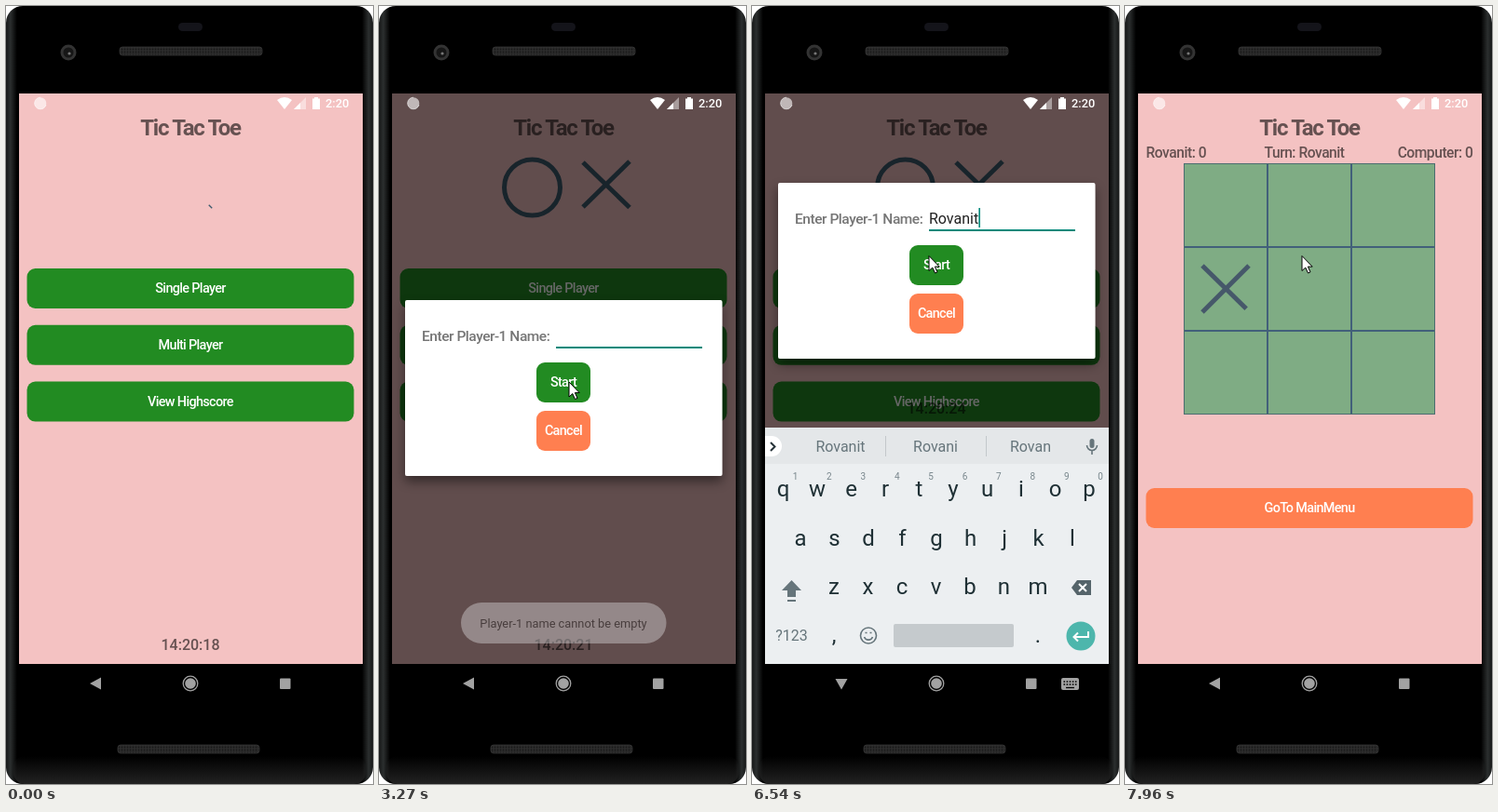
An HTML page that plays this animation: 394x836 px, repeating every 7.99 s.

```html
<!DOCTYPE html>
<html lang="en">
<head>
<meta charset="utf-8">
<title>Tic Tac Toe</title>
<style>
html, body { margin: 0; width: 100%; height: 100%; overflow: hidden; background: #fff; }
svg { display: block; width: 100%; height: 100%; font-family: Roboto, sans-serif; }
.mid { text-anchor: middle; }
.title { font-size: 24px; font-weight: 700; letter-spacing: -.053em; }
.ink { fill: rgba(0, 0, 0, .58); }
.btn { font-size: 14.4px; font-weight: 500; letter-spacing: -.045em; fill: #fff; text-anchor: middle; }
.score { font-size: 15.6px; font-weight: 500; letter-spacing: -.03em; }
.mark { fill: none; stroke: #3d5b6d; stroke-width: 5; }
.green { fill: #228b22; }
.coral { fill: #ff7f50; }
.keys text { fill: #1f3035; text-anchor: middle; }
.keys .hint { font-size: 10px; fill: #78868c; }
.keys .word { font-size: 16px; fill: #66757b; }

.move { animation: 7.99s linear infinite; }
#cursor { animation-name: cursor; }
#dim { animation-name: dim; }
#dialog { animation-name: dialog; transform-box: fill-box; transform-origin: center; }
#toast { animation-name: toast; }
#keyboard { animation-name: keyboard; }
#game { animation-name: game; }
#clock { animation-name: clock; animation-timing-function: step-end; }
#backDown { animation-name: typing; animation-timing-function: step-end; }
#backLeft { animation-name: idle; animation-timing-function: step-end; }
#slashMove { animation-name: slash; }
#backMove { animation-name: backslash; }

@keyframes cursor {
  0%, 4.4% { translate: 25px 840px; }
  6.9% { translate: 97px 700px; }
  8.8% { translate: 105px 480px; }
  10.6% { translate: 76px 322px; }
  15%, 31.3% { translate: 131px 315px; }
  35.7%, 71.3% { translate: 204px 404px; }
  77.6%, 100% { translate: 190px 268.5px; }
}
@keyframes dim {
  0%, 21.15% { opacity: 0; }
  23.15%, 82.5% { opacity: .6; }
  85% { opacity: .08; }
  85.4%, 100% { opacity: 0; }
}
@keyframes dialog {
  0%, 21.15% { opacity: 0; scale: .9; translate: 0 316px; }
  23% { opacity: 1; scale: 1; }
  55.57% { translate: 0 316px; animation-timing-function: ease-out; }
  57.57% { translate: 0 190px; }
  82.5% { opacity: 1; }
  84.4%, 100% { opacity: 0; scale: 1; translate: 0 190px; }
}
@keyframes toast {
  0%, 39.8% { opacity: 0; }
  42.6%, 64.5% { opacity: 1; }
  67%, 100% { opacity: 0; }
}
@keyframes keyboard {
  0%, 57.6% { opacity: 0; translate: 0 63px; }
  59.8%, 84% { opacity: 1; translate: 0 0; }
  85% { opacity: .42; translate: 0 29px; }
  85.9%, 100% { opacity: 0; translate: 0 63px; }
}
@keyframes game {
  0%, 86.4% { opacity: 0; translate: 0 40px; animation-timing-function: ease-out; }
  89.5%, 100% { opacity: 1; translate: 0 0; }
}
@keyframes clock {
  0% { translate: 0 0; }
  59.8%, 100% { translate: 0 -254px; }
}
@keyframes typing {
  0% { opacity: 0; }
  55.6% { opacity: 1; }
  83.9%, 100% { opacity: 0; }
}
@keyframes idle {
  0% { opacity: 1; }
  55.6% { opacity: 0; }
  83.9%, 100% { opacity: 1; }
}
@keyframes slash {
  0%, 90.74% { stroke-dasharray: 0 2; }
  95.3%, 100% { stroke-dasharray: 1 2; }
}
@keyframes backslash {
  0%, 95.3% { stroke-dasharray: 0 2; }
  99.9%, 100% { stroke-dasharray: 1 2; }
}
</style>
</head>
<body>
<svg viewBox="0 0 394 836">
  <defs>
    <linearGradient id="edge">
      <stop offset="0" stop-color="#171919"/><stop offset=".012" stop-color="#2b2e2e"/>
      <stop offset=".03" stop-color="#000"/><stop offset=".97" stop-color="#000"/>
      <stop offset=".988" stop-color="#2b2e2e"/><stop offset="1" stop-color="#171919"/>
    </linearGradient>
    <linearGradient id="chin" x2="0" y2="1">
      <stop offset="0" stop-color="#222" stop-opacity="0"/><stop offset="1" stop-color="#222"/>
    </linearGradient>
    <linearGradient id="shine">
      <stop offset="0" stop-color="#222"/><stop offset=".4" stop-color="#8b8f8c"/>
      <stop offset="1" stop-color="#222"/>
    </linearGradient>
    <pattern id="mesh" width="3" height="3" patternUnits="userSpaceOnUse">
      <rect width="3" height="3" fill="#2c2c2c"/><circle cx="1.5" cy="1.5" r=".9" fill="#181818"/>
    </pattern>
    <clipPath id="screen"><rect x="14" y="94" width="369" height="613"/></clipPath>
    <clipPath id="imeArea"><rect x="14" y="94" width="369" height="656"/></clipPath>
    <filter id="shadow" x="-10%" y="-10%" width="120%" height="130%">
      <feDropShadow dx="0" dy="6" stdDeviation="6" flood-opacity=".45"/>
    </filter>
  </defs>

  <!-- phone -->
  <rect width="394" height="836" rx="18" fill="url(#edge)"/>
  <rect x="8" y="806" width="378" height="30" rx="12" fill="url(#chin)"/>
  <path d="M28 8.5H366" stroke="url(#shine)" stroke-width="1.5"/>
  <rect x="185" y="18" width="26" height="9" rx="4.5" fill="#14141a"/>
  <rect x="122" y="44" width="153" height="9" rx="3" fill="url(#mesh)" stroke="#3a3a3a" stroke-width=".7"/>
  <rect x="120" y="794" width="152" height="9" rx="3" fill="url(#mesh)" stroke="#3a3a3a" stroke-width=".7"/>
  <circle cx="67" cy="50" r="8.5" fill="#333"/>
  <circle cx="67" cy="50" r="5.5" fill="#161616"/>
  <circle cx="68" cy="51" r="1.6" fill="#777"/>

  <g clip-path="url(#screen)">
    <rect x="14" y="94" width="369" height="613" fill="#f4c2c2"/>
    <text class="title ink mid" x="198" y="139">Tic Tac Toe</text>
    <g class="mark">
      <path id="ring" pathLength="1" d="M134.500 195a30 30 0 0 1 60 0a30 30 0 0 1 -60 0"/>
      <path id="slash" pathLength="1" d="M219 216L269 167"/>
      <path id="backslash" pathLength="1" d="M219 168L269 216.500"/>
    </g>
    <g id="menu"></g>
    <g id="clock" class="move"><text id="time" class="ink mid" x="198" y="692" font-size="16" font-weight="500"></text></g>
    <rect id="dim" class="move" x="14" y="94" width="369" height="613"/>

    <g id="dialog" class="move">
      <rect x="28" width="340.500" height="189" rx="2" fill="#fff" filter="url(#shadow)"/>
      <text x="46" y="44" font-size="15.500" letter-spacing="-.030em" font-weight="500" fill="#757575">Enter Player-1 Name:</text>
      <text id="field" x="190" y="44" font-size="16" fill="#212121"></text>
      <path d="M190 51H347" stroke="#00897b" stroke-width="1.800"/>
      <path id="caret" d="M0 27V48" stroke="#00897b" stroke-width="1.600"/>
      <g id="choices"></g>
    </g>
  </g>

  <g clip-path="url(#imeArea)">
    <g id="keyboard" class="move keys">
      <rect x="14" y="453" width="369" height="254" fill="#eceff1"/>
      <rect x="14" y="453" width="369" height="39" fill="#e4e7e9"/>
      <path d="M14 462H21A11 11 0 0 1 21 484H14Z" fill="#fff"/>
      <path d="M20 469L24.500 473.500L20 478" fill="none" stroke="#263238" stroke-width="2"/>
      <path d="M143.500 462V484M251.500 462V484" stroke="#c3c8cb"/>
      <g id="words"></g>
      <g stroke="#66757b" fill="none" stroke-width="1.600">
        <rect x="362.500" y="465" width="5" height="10" rx="2.500" fill="#66757b" stroke="none"/>
        <path d="M359.500 472a5.500 5.500 0 0 0 11 0M365 478V482"/>
        <circle cx="125" cy="676.500" r="8.500"/>
        <path d="M120.500 678a4.800 4.800 0 0 0 9 0M121.500 673.500h2M126.500 673.500h2"/>
      </g>
      <path d="M42.500 617L53 628H47V635H38V628H32ZM38 638H47V640H38Z" fill="#66757b"/>
      <path d="M349 617H364V633H349L343 625Z" fill="#55646a"/>
      <path d="M351 621L359 629M359 621L351 629" stroke="#fff" stroke-width="2"/>
      <rect x="152" y="664" width="129" height="25" rx="2" fill="#c5cacd"/>
      <circle cx="353" cy="677" r="15.500" fill="#4db6ac"/>
      <path d="M361 672V678H346M350 673.500L345.500 678L350 682.500" fill="none" stroke="#fff" stroke-width="2"/>
    </g>
  </g>

  <g id="toast" class="move">
    <rect x="88" y="641" width="220.500" height="44" rx="22" fill="#e1dfe0"/>
    <text class="mid" x="198" y="668" font-size="12.800" fill="#262626">Player-1 name cannot be empty</text>
  </g>

  <g clip-path="url(#screen)">
    <g id="game" class="move">
      <rect x="14" y="94" width="369" height="653" fill="#f4c2c2"/>
      <text class="title ink mid" x="198" y="139">Tic Tac Toe</text>
      <g class="score ink">
        <text id="player" x="22.500" y="163"></text>
        <text id="turn" class="mid" x="192.500" y="163"></text>
        <text x="373.500" y="163" text-anchor="end">Computer: 0</text>
      </g>
      <rect x="63.500" y="169.500" width="269" height="269" fill="#7fac84" stroke="#4b6d70"/>
      <path d="M153 170V438M243 170V438M64 259H332M64 349H332" stroke="#42607a" stroke-width="2"/>
      <g class="mark" style="stroke: #46586a">
        <path id="slashMove" class="move" pathLength="1" d="M83 329L133 279"/>
        <path id="backMove" class="move" pathLength="1" d="M83 279L133 328"/>
      </g>
      <g id="exit"></g>
    </g>
  </g>

  <!-- status and navigation bars -->
  <g fill="#fff">
    <circle cx="37" cy="104.500" r="6.300" opacity=".6"/>
    <path d="M37 98.200a6.300 6.300 0 1 0 6 8" fill="none" stroke="#fff" opacity=".6"/>
    <path d="M291 101Q299 95 307 101L299 111Z"/>
    <path d="M322 98V111H309Z" opacity=".45"/>
    <path d="M316 104V111H309Z"/>
    <path d="M329 99.500H331V98H335V99.500H337V111H329Z"/>
    <text x="343" y="109" font-size="12.800" font-weight="500">2:20</text>
  </g>
  <g fill="#a2a2a2">
    <path id="backLeft" class="move" d="M90 728L102 721.500V734.500Z"/>
    <g id="backDown" class="move">
      <path d="M89.500 723H102.500L96 734.500Z"/>
      <rect x="332" y="722" width="19" height="13" rx="2"/>
      <path d="M334.500 726H349M334.500 729H349" stroke="#000" stroke-width="1.500" stroke-dasharray="1.600 1.500"/>
      <path d="M337 732.500H346" stroke="#000" stroke-width="1.300"/>
    </g>
    <circle cx="198" cy="728" r="7.800" fill="none" stroke="#a2a2a2" stroke-width="1.300"/>
    <circle cx="198" cy="728" r="5.800"/>
    <rect x="294" y="722.500" width="11.500" height="11.500" rx="1"/>
  </g>

  <g id="cursor" class="move">
    <path d="M0 0V16L3.800 12.600L6.500 18.500L9 17.400L6.400 11.600H11.200Z" fill="#fff" stroke="#000"/>
  </g>
</svg>

<script>
const LOOP = 7990, LOGO = 1921, STROKE = 157, RING = 236;
const NAME = 'Rovanit';
const STALLS = [[1540, 1690], [5440, 5600]];
const $ = id => document.getElementById(id);

function add(parent, tag, attrs, content = '') {
  const el = document.createElementNS('http://www.w3.org/2000/svg', tag);
  for (const key in attrs) el.setAttribute(key, attrs[key]);
  el.textContent = content;
  return parent.appendChild(el);
}

function button(parent, label, y, color = 'green', x = 22.5, width = 351) {
  add(parent, 'rect', { x, y, width, height: 43, rx: 9, class: color });
  add(parent, 'text', { x: 198, y: y + 26, class: 'btn' }, label);
}

['Single Player', 'Multi Player', 'View Highscore']
  .forEach((label, i) => button($('menu'), label, 282 + 60.8 * i));
button($('choices'), 'Start', 67, 'green', 169, 58);
button($('choices'), 'Cancel', 119, 'coral', 169, 58);
button($('exit'), 'GoTo MainMenu', 518, 'coral');
$('player').textContent = NAME + ': 0';

const key = (label, x, y, size = 24) =>
  add($('keyboard'), 'text', { x, y, 'font-size': size }, label);
[['qwertyuiop', 33.5], ['asdfghjkl', 52], ['zxcvbnm', 88]].forEach(([row, x], r) =>
  [...row].forEach((letter, i) => key(letter, x + 36.5 * i, 527 + 52.6 * r)));
[...'1234567890'].forEach((digit, i) =>
  add($('keyboard'), 'text', { x: 46.5 + 36.4 * i, y: 509, class: 'hint' }, digit));
add($('keyboard'), 'text', { x: 42.5, y: 682, class: 'word' }, '?123');
key(',', 88, 684);
key('.', 307, 684);
const words = [95, 197, 299].map(x => add($('words'), 'text', { x, y: 479, class: 'word' }));

const ramp = (t, start, span) => Math.min(1, Math.max(0, (t - start) / span));
const trim = (id, part) => $(id).setAttribute('stroke-dasharray', `${part} 2`);
const setText = (el, value) => { if (el.textContent !== value) el.textContent = value; };

function drawLogo(t) {
  for (const [from, to] of STALLS) if (t >= from && t < to) t = from;
  const p = (t + 3) % LOGO;
  trim('slash', ramp(p, 0, STROKE) - ramp(p, 1524, STROKE));
  trim('backslash', ramp(p, STROKE, STROKE) - ramp(p, 1367, STROKE));
  trim('ring', ramp(p, 2 * STROKE, RING) - ramp(p, 1681, RING));
}

function drawField(t) {
  const count = t < 4450 ? 0 : Math.min(NAME.length, 1 + Math.floor((t - 4450) / 150));
  const typed = NAME.slice(0, count);
  setText($('field'), typed);
  $('field').setAttribute('text-decoration', t > 5450 ? 'none' : 'underline');
  words.forEach((word, i) => setText(word, typed.slice(0, Math.max(0, count - i))));
  const blink = Math.floor((t - 1850) / 500) % 2 === 1;
  $('caret').setAttribute('opacity', blink ? 1 : 0);
  $('caret').setAttribute('transform', `translate(${191 + $('field').getComputedTextLength()})`);
}

let start;
function render(now) {
  start ??= now;
  const t = (now - start) % LOOP;
  drawLogo(t);
  drawField(t);
  setText($('time'), '14:20:' + (18 + Math.floor((t + 200) / 1000)));
  setText($('turn'), 'Turn: ' + (t < 7250 ? 'Computer' : NAME));
  requestAnimationFrame(render);
}
requestAnimationFrame(render);
</script>
</body>
</html>
```
